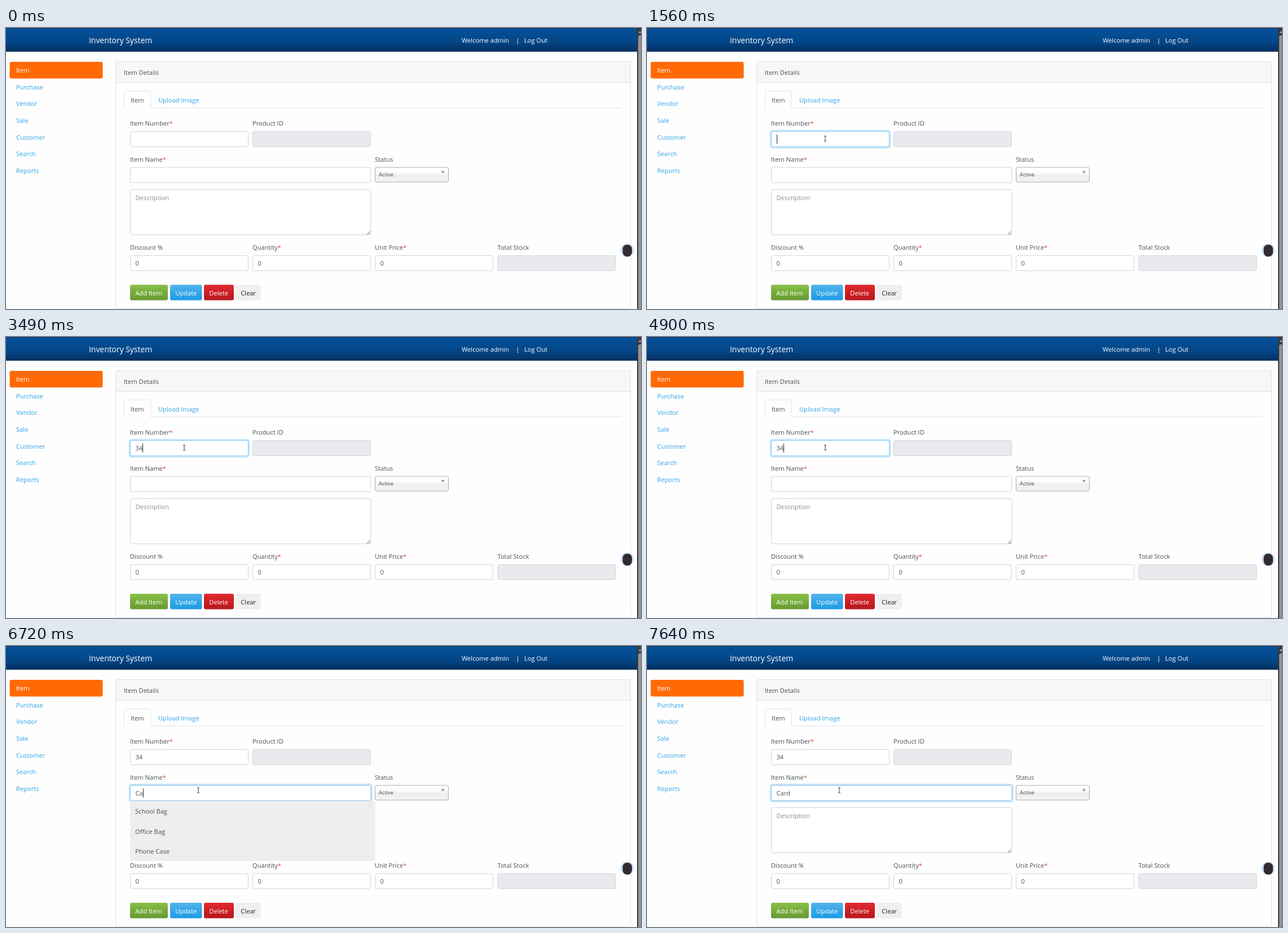
An HTML page that plays this animation: 1126 by 498 pixels, repeating every 8 s.

```html
<!DOCTYPE html>
<html lang="en">
<head>
<meta charset="utf-8">
<title>Inventory form</title>
<style>
  html, body { margin: 0; width: 100%; height: 100%; overflow: hidden; background: #fefefe; }
  svg { display: block; width: 100%; height: 100%; }
  text { font: 11.15px "Open Sans", "Noto Sans", sans-serif; fill: #495057; white-space: pre; }
  .title { font-size: 13.9px; }
  .light { fill: #fff; }
  .link { fill: #2fa4e7; }
  .hint { fill: #868e96; }
  .small { font-size: 9.4px; fill: #444; }
  .dark { fill: #212529; }
  .star { fill: #e8501c; }
</style>
</head>
<body>
<svg id="stage" viewBox="0 0 1126 498" xmlns="http://www.w3.org/2000/svg"></svg>
<script>
const LOOP = 8000;
const stage = document.getElementById('stage');

// ---- markup helpers ----
const text = (x, y, str, cls = '', id = '') =>
  `<text x="${x}" y="${y}" class="${cls}" id="${id}">${str}</text>`;
const label = (x, y, str, required) =>
  text(x, y, str + (required ? '<tspan class="star">*</tspan>' : ''));
const rect = (x, y, w, h, fill, r = 0, extra = '') =>
  `<rect x="${x}" y="${y}" width="${w}" height="${h}" rx="${r}" fill="${fill}" ${extra}/>`;
const box = (x, y, w, h, fill = '#fff', stroke = '#ced4da', id = '') =>
  rect(x + .5, y + .5, w - 1, h - 1, fill, 3, `stroke="${stroke}" id="${id}"`);
const gradient = (id, ...stops) =>
  `<linearGradient id="${id}" x2="0" y2="1">${stops.map(([at, color]) =>
    `<stop offset="${at}" stop-color="${color}"/>`).join('')}</linearGradient>`;
const button = (x, w, fill, str, cls = 'light') =>
  rect(x, 455, w, 27.5, fill, 3) + text(x + 9.3, 473.5, str, cls);
const menu = (id, x, y, w, items) =>
  `<g id="${id}">${rect(x, y, w, items.length * 35.4, '#eee')}${items.map((item, i) =>
    text(x + 9, y + 22.3 + i * 35.4, item)).join('')}</g>`;
const glow = (id, x, y, w, h) =>
  `<g id="${id}" fill="none">${rect(x - 1.2, y - 1.2, w + 2.4, h + 2.4, 'none', 4,
    'stroke="#2fa4e7" stroke-opacity=".27" stroke-width="2.4"')}${box(x, y, w, h, 'none', '#8ccdf2')}</g>`;

const defs = `<defs>
  ${gradient('bar', [0, '#04519b'], [.6, '#044687'], [1, '#03305f'])}
  ${gradient('green', [0, '#88c149'], [.6, '#73a839'], [1, '#699934'])}
  ${gradient('blue', [0, '#54b4eb'], [.6, '#2fa4e7'], [1, '#1d9ce5'])}
  ${gradient('red', [0, '#e12b31'], [.6, '#c71c22'], [1, '#b5191f'])}
  ${gradient('select', [.2, '#fff'], [.5, '#f6f6f6'], [.52, '#eee'], [1, '#f4f4f4'])}
</defs>`;

const header = rect(0, 0, 1119, 42, 'url(#bar)') + rect(0, 0, 1126, 1, '#24384c') +
  text(147, 27, 'Inventory System', 'title light') +
  text(808, 26, 'Welcome admin', 'light') + text(904.5, 26, '|', 'light') +
  text(919, 26, 'Log Out', 'light');

const scrollbar = rect(1119, 0, 7, 498, '#36383b') + rect(1121, 13, 7, 500, '#929394', 3) +
  '<path d="M1121.5 9l2.5-4 2 3v1z" fill="#a5a5a5"/>';

const sidebar = rect(6.5, 60, 165, 29.5, '#ff6a07', 3) +
  ['Item', 'Purchase', 'Vendor', 'Sale', 'Customer', 'Search', 'Reports'].map((name, i) =>
    text(18, 79.2 + i * 29.6, name, i ? 'link' : 'light')).join('');

const card = box(194, 59, 914, 439, '#fefefe', '#dfdfdf') +
  '<path d="M194.5 96.5V63q0-3.5 3.5-3.5H1104q3.5 0 3.5 3.5V96.500z" fill="#f7f7f7" stroke="#dfdfdf"/>' +
  text(209, 83, 'Item Details') +
  '<path d="M209 141.500H1092" stroke="#dee2e6"/>' +
  '<path d="M209.500 142V114.500q0-3 3-3H253.500q3 0 3 3V142" fill="#fefefe" stroke="#dee2e6"/>' +
  text(221, 131.5, 'Item') + text(270, 131.5, 'Upload Image', 'link');

const columns = [220, 437, 654, 871.5];
const lower = [['Discount %'], ['Quantity', true], ['Unit Price', true], ['Total Stock']];
const form =
  label(220, 173.3, 'Item Number', true) + box(220, 183, 210, 28) +
  label(437, 173.3, 'Product ID') + box(437, 183, 210, 28, '#e9eaed') +
  label(220, 236.7, 'Item Name', true) + box(220, 246.5, 427.5, 28) +
  label(654, 236.7, 'Status') + box(654, 246.5, 131, 27, 'url(#select)', '#aaa') +
  text(661, 263.3, 'Active', 'small') + '<path d="M772 253.500h5.500l-2.750 4.500z" fill="#888"/>' +
  box(220, 286, 427.5, 81) + text(229.5, 304.7, 'Description', 'hint') +
  '<path d="M640 366l5.500-5.500M643.500 366l2-2" stroke="#555"/>' +
  lower.map(([name, required], i) => label(columns[i], 392.7, name, required) +
    box(columns[i], 403, 210, 27.5, i < 3 ? '#fff' : '#e9eaed') +
    (i < 3 ? text(columns[i] + 9.5, 421, '0') : '')).join('') +
  button(220, 67, 'url(#green)', 'Add Item') + button(291, 56.5, 'url(#blue)', 'Update') +
  button(351, 53, 'url(#red)', 'Delete') + button(407, 45, '#efefef', 'Clear', 'dark');

const helper = '<circle cx="1101.500" cy="394" r="12" fill="#cfe4fa"/>' +
  rect(1093.5, 384, 16.5, 21, '#332b30', 7.5);

const live = glow('numberGlow', 220, 183, 210, 28) + glow('nameGlow', 220, 246.5, 427.5, 28) +
  text(229.5, 201.3, '', '', 'numberText') + text(229.5, 264.6, '', '', 'nameText') +
  menu('numberMenu', 220, 211.3, 217, ['3', '13']) +
  menu('nameMenu', 220, 274.8, 434.5, ['School Bag', 'Office Bag', 'Phone Case']) +
  rect(0, 0, 1, 16, '#222', 0, 'id="caret"') +
  `<g id="pointer">
    <circle id="press" r="8.7" fill="#f8ee4c"/>
    <path id="arrow" d="M.5.5V9.500L2.600 7.600 4 10.800 5.400 10.200 4 7.100H6.500z" fill="#fff" stroke="#333" stroke-width=".9"/>
    <path id="beam" d="M-2-4.500H-.7L0-4 .7-4.500H2M0-4V4M-2 4.500H-.7L0 4 .7 4.500H2" fill="none" stroke="#333"/>
  </g>`;

stage.innerHTML = defs + header + sidebar + card + form + helper + scrollbar + live;
const el = {};
stage.querySelectorAll('[id]').forEach(node => { if (node.id) el[node.id] = node; });

// ---- timeline ----
const latest = (table, t) => table.reduce((value, [at, next]) => t >= at ? next : value, table[0][1]);
const between = (t, from, to) => t >= from && t < to;
const show = (node, on) => node.setAttribute('opacity', +on);

// start, end, from, to, number of held positions
const moves = [
  [120, 820, [1018, 488], [310, 179.5], 10],
  [1160, 1290, [310, 179.5], [316, 196], 2],
  [4900, 5230, [316, 196], [341, 255.5], 5],
];
const presses = [[890, 1090], [1430, 1560], [5500, 5710]];
const numberTyping = [[0, ''], [3230, '3'], [3430, '34']];
const nameTyping = [[0, ''], [6580, 'C'], [6720, 'Ca'], [6850, 'Car'], [7110, 'Card']];
const numberFade = [[0, 0], [3230, .25], [3300, 1], [3430, .8], [3490, 0]];
const nameFade = [[0, 0], [6580, .2], [6720, 1], [6850, .5], [6910, 0]];
const caretResets = [1430, 3230, 3430, 5510, 6580, 6720, 6850, 7110];
const editable = [[220, 183, 430, 211], [437, 183, 647, 211], [220, 247, 647, 274],
  [220, 286, 647, 367], ...columns.map(x => [x, 403, x + 210, 430])];

function pointerAt(t) {
  const move = moves.filter(m => t >= m[0]).pop();
  if (!move) return null;
  const [start, end, from, to, steps] = move;
  const p = Math.min(1, Math.floor((t - start) / (end - start) * steps + 1e-6) / steps);
  const eased = p * p * (3 - 2 * p);
  return from.map((v, i) => v + (to[i] - v) * eased);
}

const ramp = (t, start) =>
  t < start ? 0 : [.35, .8, 1][Math.min(2, Math.floor((t - start) / 65))];

function render(t) {
  show(el.numberGlow, 0);
  el.numberGlow.setAttribute('opacity', ramp(t, 1430) - ramp(t, 5500));
  el.nameGlow.setAttribute('opacity', ramp(t, 5500));
  el.numberText.textContent = latest(numberTyping, t);
  el.nameText.textContent = latest(nameTyping, t);
  el.numberMenu.setAttribute('opacity', latest(numberFade, t));
  el.nameMenu.setAttribute('opacity', latest(nameFade, t));

  const reset = caretResets.filter(at => at <= t).pop();
  const onName = t >= 5500;
  const field = onName ? el.nameText : el.numberText;
  const width = field.textContent ? field.getComputedTextLength() : 0;
  el.caret.setAttribute('x', Math.round(229.5 + width));
  el.caret.setAttribute('y', onName ? 252.5 : 189);
  show(el.caret, reset !== undefined && Math.floor((t - reset) / 530) % 2 === 0);

  const at = pointerAt(t);
  show(el.pointer, at !== null);
  if (!at) return;
  const [x, y] = at;
  const overField = editable.some(([l, top, r, b]) => x >= l && x <= r && y >= top && y <= b);
  el.pointer.setAttribute('transform', `translate(${x} ${y})`);
  show(el.beam, overField);
  show(el.arrow, !overField);
  show(el.press, presses.some(([from, to]) => between(t, from, to)));
}

const begin = performance.now();
function tick() {
  render((performance.now() - begin) % LOOP);
  requestAnimationFrame(tick);
}
tick();
</script>
</body>
</html>
```
